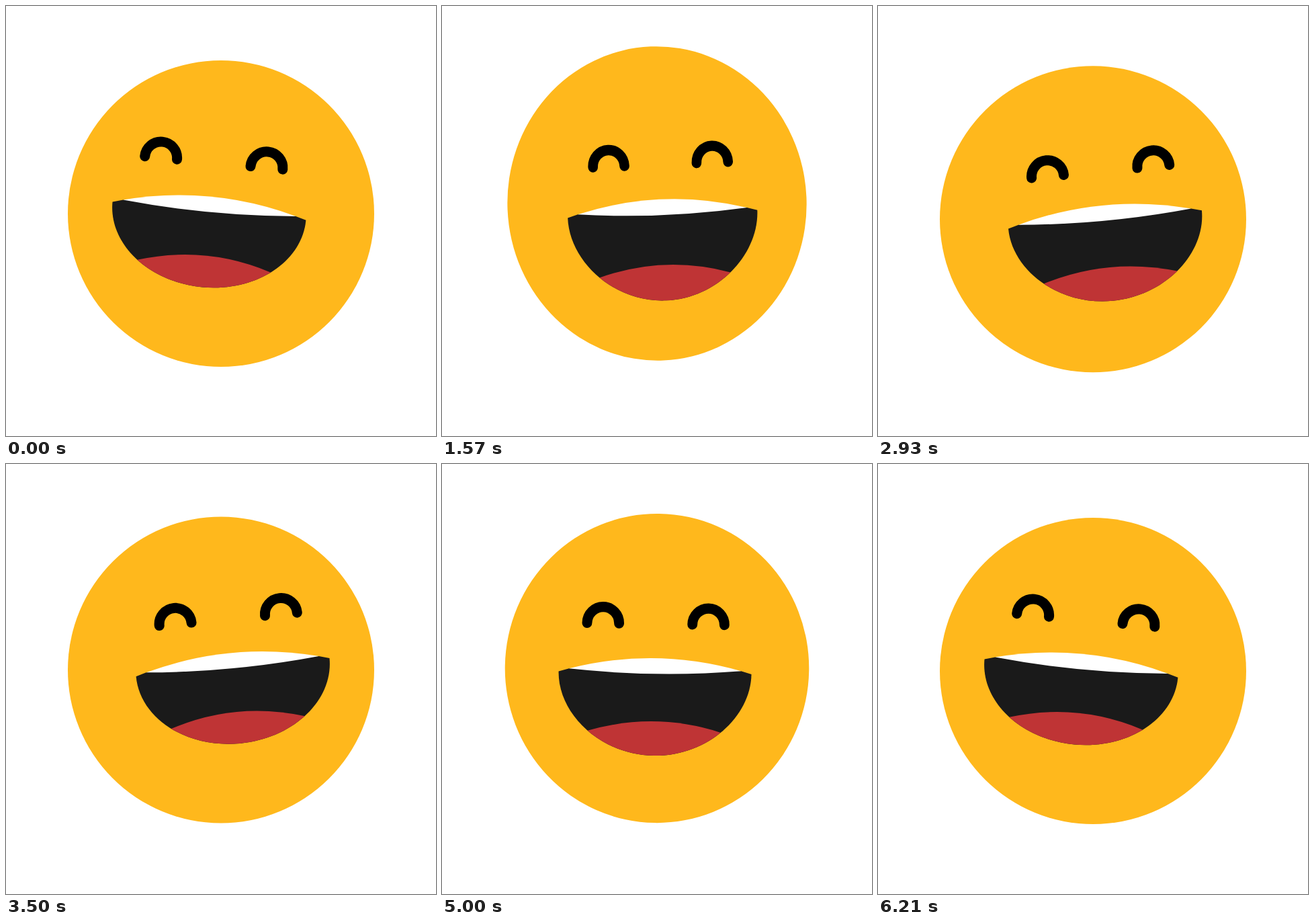
Animation, 640 px wide and 640 px high, one loop 6280 ms. Source, as an HTML page:

```html
<!DOCTYPE html>
<html lang="en">
<head>
<meta charset="utf-8">
<title>Laughing face</title>
<style>
  html, body { margin: 0; width: 100%; height: 100%; overflow: hidden; background: #fff; }
  svg { display: block; width: 100vw; height: 100vh; }
</style>
</head>
<body>
<svg viewBox="0 0 640 640">
  <defs>
    <clipPath id="inside"><path id="opening"/></clipPath>
  </defs>
  <g id="head">
    <circle r="228" fill="#ffb81c"/>
    <g id="face">
      <g fill="none" stroke="#000" stroke-width="15" stroke-linecap="round">
        <path d="M-103 -72a24 24 0 0 1 48 0"/>
        <path d="M55 -72a24 24 0 0 1 48 0"/>
      </g>
      <path id="mouth" fill="#1a1a1a"/>
      <path id="tongue" fill="#bf3435" clip-path="url(#inside)"/>
      <path d="M-129 -4.4Q0 -38.6 129 -4.4Q0 7.5 -129 -4.4Z" fill="#fff"/>
    </g>
  </g>
</svg>
<script>
const LOOP = 6280, FPS = 14;
const BOB = { period: 12.48, peak: 2.76, mid: 308, size: 5.5 };
const TILT = 5.4;
const JUMP_STARTS = [0, 50.4];
// Times inside one jump, in steps
const KEY = { crouch: 8.8, low: 15, top: 21.4, land: 27.7, turn: 12.3, turned: 33 };
const LOW = { y: 340.6, sx: 1.05, sy: 0.95 };
const TOP = { y: 293, sx: 0.975, sy: 1.027 };

const [head, face, opening, mouth, tongue] = ['head', 'face', 'opening', 'mouth', 'tongue']
  .map(id => document.getElementById(id));

const mix = (a, b, u) => a + (b - a) * u;
const mixPose = (a, b, u) => ({ y: mix(a.y, b.y, u), sx: mix(a.sx, b.sx, u), sy: mix(a.sy, b.sy, u) });
const ramp = (x, from, to) => Math.min(1, Math.max(0, (x - from) / (to - from)));
const sine = u => (1 - Math.cos(Math.PI * u)) / 2;
const brisk = u => (u + sine(u)) / 2;
const easeOut = u => 1 - (1 - u) ** 2;
const swell = (x, from, full, fade, end) =>
  sine(ramp(x, from, full)) * (1 - sine(ramp(x, fade, end)));

function jump(x, rest) {
  if (x < KEY.crouch || x > KEY.land) return rest;
  if (x < KEY.low) {
    const start = { y: BOB.mid - BOB.size, sx: 1, sy: 1 };
    return mixPose(start, LOW, sine(ramp(x, KEY.crouch, KEY.low)));
  }
  if (x < KEY.top) return mixPose(LOW, TOP, brisk(ramp(x, KEY.low, KEY.top)));
  return mixPose(TOP, rest, brisk(ramp(x, KEY.top, KEY.land)));
}

function draw(ms) {
  const step = Math.floor((ms % LOOP + 5) * FPS / 1000);
  const laugh = swell(step, 15, 28, 31, 48) + 0.8 * swell(step, 65, 75, 75, 82);
  const angle = 2 * Math.PI * (step - BOB.peak) / BOB.period;
  let pose = { y: BOB.mid + BOB.size * Math.cos(angle) + 11.7 * laugh, sx: 1, sy: 1 };
  let tilt = TILT;

  JUMP_STARTS.forEach((start, i) => {
    const x = step - start;
    tilt += (i ? 2 : -2) * TILT * easeOut(ramp(x, KEY.turn, KEY.turned));
    pose = jump(x, pose);
  });

  const { y, sx, sy } = pose;
  const stretch = Math.max(0, (sy - 1) / (TOP.sy - 1));
  const faceY = -2.2 + 12.5 * laugh + 11.5 * stretch;
  head.setAttribute('transform', `translate(320 ${y}) rotate(${tilt}) scale(${sx} ${sy})`);
  face.setAttribute('transform', `translate(${-3.3 * tilt} ${faceY})`);
  drawMouth(113.8 + 21 * laugh);
}

function drawMouth(depth) {
  const outline = 'M-144.6 0L-129 -4.4Q0 -10 129 -4.4L144.6 0'
    + `C144.6 63 79.8 ${depth} 0 ${depth}C-79.8 ${depth} -144.6 63 -144.6 0Z`;
  const side = 23 + 0.5225 * depth;
  const crest = 0.7175 * depth - 31;
  opening.setAttribute('d', outline);
  mouth.setAttribute('d', outline);
  tongue.setAttribute('d', `M-100 ${side}Q0 ${crest} 100 ${side}V150H-100Z`);
}

const begin = performance.now();
function tick() {
  draw(performance.now() - begin);
  requestAnimationFrame(tick);
}
tick();
</script>
</body>
</html>
```
